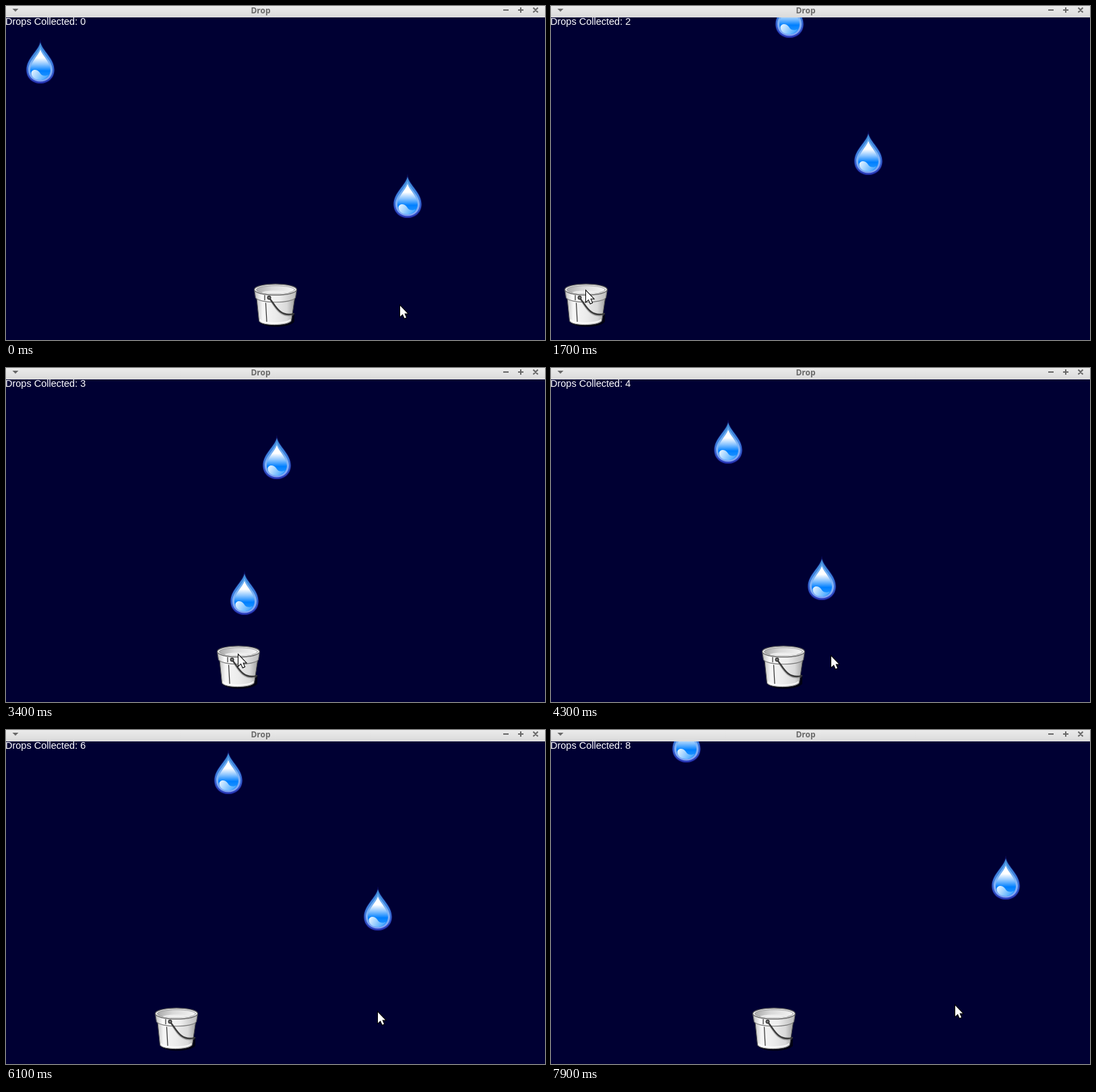
An HTML page with a canvas for the animation above (8000 ms loop, 800 px wide and 497 px high).

```html
<!DOCTYPE html>
<html lang="en">
<head>
<meta charset="utf-8">
<title>Drop</title>
<style>
html, body { margin: 0; width: 100%; height: 100%; overflow: hidden; background: #000033; }
canvas { display: block; }
</style>
</head>
<body>
<canvas id="stage" width="800" height="497"></canvas>
<script>
const ctx = document.getElementById('stage').getContext('2d');
const LOOP = 8000, STEP = 100;
const SPEED = 0.2;       // fall speed, px per ms
const CATCH_Y = 350;     // tip height at which a drop lands in the bucket

// [centre x, time of birth]
const drops = [
  [596, -1500], [51, -500], [471, 520], [354, 1540], [402, 2550],
  [263, 3565], [552, 4585], [330, 5600], [675, 6615], [201, 7635]
];
// [step, centre x]: the bucket jumps to each click
const clicks = [[0, 400], [1, 585], [11, 52], [23, 467], [32, 345], [44, 412], [51, 253], [62, 552], [72, 331]];
// [step, x, y] of the pointer
const pointer = [
  [0, 585, 446], [3, 585, 446], [9, 67, 418], [11, 52, 424], [17, 52, 424],
  [23, 467, 419], [26, 467, 419], [32, 345, 425], [38, 345, 431], [43, 416, 429],
  [44, 412, 429], [47, 412, 428], [51, 253, 404], [52, 253, 404], [53, 272, 402],
  [60, 552, 420], [65, 552, 420], [69, 357, 409], [71, 331, 409], [74, 331, 409], [79, 600, 410]
];

function ramp(x0, y0, x1, y1, ...stops) {
  const g = ctx.createLinearGradient(x0, y0, x1, y1);
  stops.forEach(([at, color]) => g.addColorStop(at, color));
  return g;
}

function fill(d, style) {
  ctx.fillStyle = style;
  ctx.fill(new Path2D(d));
}

function stroke(d, style, width) {
  ctx.strokeStyle = style;
  ctx.lineWidth = width;
  ctx.stroke(new Path2D(d));
}

function at(x, y, draw) {
  ctx.save();
  ctx.translate(x, y);
  draw();
  ctx.restore();
}

const SHELL = 'M0 0 C3 13 20.5 24 20.5 41 C20.5 53 11.5 61 0 61 C-11.5 61 -20.5 53 -20.5 41 C-20.5 24 -3 13 0 0Z';
const RIM = 'M0 6 C3 17 18 28 18 41 C18 51.5 10 58.5 0 58.5 C-10 58.5 -18 51.5 -18 41 C-18 28 -3 17 0 6Z';
const CORE = 'M0 11 C3 20 15 30 15 41 C15 50 8.5 56 0 56 C-8.5 56 -15 50 -15 41 C-15 30 -3 20 0 11Z';
const WAVE = 'M-13.5 46 C-13 40 -5 39 -1 45 C2 50 6 51 12 48.5 C9 54 4 56 0 56 C-8 56 -13 52 -13.5 46Z';

function drawDrop() {
  stroke(SHELL, 'rgba(30,30,160,.35)', 2);
  fill(SHELL, ramp(0, 0, 0, 61, [0, '#3f8fd6'], [.5, '#3c7ddc'], [1, '#2a38b8']));
  fill(RIM, ramp(0, 6, 0, 59, [0, '#62a8ee'], [.55, '#80b4f6'], [1, '#7fa2f4']));
  fill(CORE, ramp(0, 11, 0, 56, [0, '#fff'], [.27, '#fff'], [.48, '#8cc5ff'], [.7, '#0080ff'], [1, '#2f9cff']));
  fill(WAVE, ramp(-12, 42, 9, 56, [0, '#e4f3ff'], [.45, '#9bd0ff'], [1, '#3ba2ff']));
}

const BODY = 'M4 22 L7.5 56 C12 63.5 49 63.5 55.5 56 L60.5 22Z';
const BAND = 'M.7 9 L2.5 21 C8 30 56 30 61.5 21 L63.3 9Z';

function drawBucket() {
  ctx.lineCap = ctx.lineJoin = 'round';
  fill('M9 58 C18 67 52 66 60 57 L60 46Z', 'rgba(0,0,8,.75)');
  fill(BODY, ramp(4, 0, 60, 0, [0, '#c4c4c4'], [.16, '#f6f6f6'], [.5, '#ececec'], [.8, '#dadada'], [1, '#a4a4a4']));
  stroke(BODY, '#4d4d4d', 1);
  stroke('M9 54 C16 60 47 60 54 54', '#fff', 1.2);
  fill(BAND, ramp(0, 0, 64, 0, [0, '#bcbcbc'], [.18, '#fafafa'], [.6, '#ededed'], [1, '#b8b8b8']));
  stroke('M.7 9 L2.5 21 C8 30 56 30 61.5 21 L63.3 9', '#777', 1.2);
  ctx.beginPath();
  ctx.ellipse(32, 9, 31.4, 8.2, 0, 0, Math.PI * 2);
  ctx.fillStyle = '#f3f3f3';
  ctx.fill();
  ctx.strokeStyle = '#5a5a5a';
  ctx.lineWidth = 1.2;
  ctx.stroke();
  ctx.beginPath();
  ctx.ellipse(32, 9.2, 28.5, 6.2, 0, 0, Math.PI * 2);
  ctx.fillStyle = ramp(4, 4, 60, 14, [0, '#a9a9a9'], [.4, '#d8d8d8'], [1, '#f4f4f4']);
  ctx.fill();
  ctx.strokeStyle = '#8a8a8a';
  ctx.lineWidth = .8;
  ctx.stroke();
  fill('M11 13 C20 9.5 44 9.5 53 13 C44 16 20 16 11 13Z', '#eee');
  stroke('M16 17.5 V24.5 M17.5 29 L19 56.5', '#333', 1.2);
  stroke('M24 24 C31 35 38 51 58 47', 'rgba(90,90,90,.4)', 2);
  stroke('M22.5 21.5 C30 28 36 51 59 45', '#3b3b3b', 2.3);
  ctx.beginPath();
  ctx.arc(22.5, 21, 2.4, 0, Math.PI * 2);
  ctx.fillStyle = '#777';
  ctx.fill();
  ctx.strokeStyle = '#2b2b2b';
  ctx.lineWidth = 1.2;
  ctx.stroke();
}

function drawPointer() {
  const arrow = 'M0 0 V16 L3.8 12.4 L6.5 18.6 L9 17.5 L6.4 11.4 H11Z';
  ctx.lineJoin = 'miter';
  stroke(arrow, '#000', 2);
  fill(arrow, '#fff');
}

function drawTitleBar() {
  ctx.fillStyle = ramp(0, 0, 0, 17, [0, '#ebebeb'], [1, '#dadada']);
  ctx.fillRect(0, 0, 800, 17);
  ctx.fillStyle = '#696969';
  ctx.font = 'bold 12px "Open Sans", "Noto Sans", sans-serif';
  ctx.textAlign = 'center';
  ctx.fillText('Drop', 378, 11);
  fill('M9.5 4 H18.5 L14 8.5Z', '#696969');
  ctx.lineCap = 'butt';
  stroke('M738 6 H746 M760 6 H768 M764 2 V10 M782.5 2.5 L789.5 9.5 M789.5 2.5 L782.5 9.5', '#696969', 2);
}

function pointerAt(step) {
  const i = Math.max(1, pointer.findIndex(p => p[0] >= step));
  const [k0, x0, y0] = pointer[i - 1], [k1, x1, y1] = pointer[i];
  const u = (step - k0) / (k1 - k0);
  return [Math.round(x0 + (x1 - x0) * u), Math.round(y0 + (y1 - y0) * u)];
}

function render(ms) {
  const step = Math.floor(ms / STEP);
  const clock = (step < 25 ? step : step - 1) * STEP;   // the game stalls for one step
  const tips = drops.map(([x, born]) => [x, Math.round(SPEED * (clock - born) - 46)]);
  const caught = tips.filter(([, y]) => y > CATCH_Y).length;
  const bucket = clicks.filter(c => c[0] <= step).pop()[1];

  ctx.fillStyle = '#000033';
  ctx.fillRect(0, 0, 800, 497);
  ctx.fillStyle = '#fff';
  ctx.font = '14.5px "Liberation Sans", Arial, sans-serif';
  ctx.textAlign = 'left';
  ctx.fillText('Drops Collected: ' + caught, -1, 28);

  at(bucket - 32, 413, drawBucket);
  for (const [x, y] of tips) {
    if (y >= -46 && y <= CATCH_Y) at(x, y, drawDrop);
  }
  drawTitleBar();
  at(...pointerAt(step), drawPointer);
}

const start = performance.now();
function tick() {
  render((performance.now() - start) % LOOP);
  requestAnimationFrame(tick);
}
tick();
</script>
</body>
</html>
```
